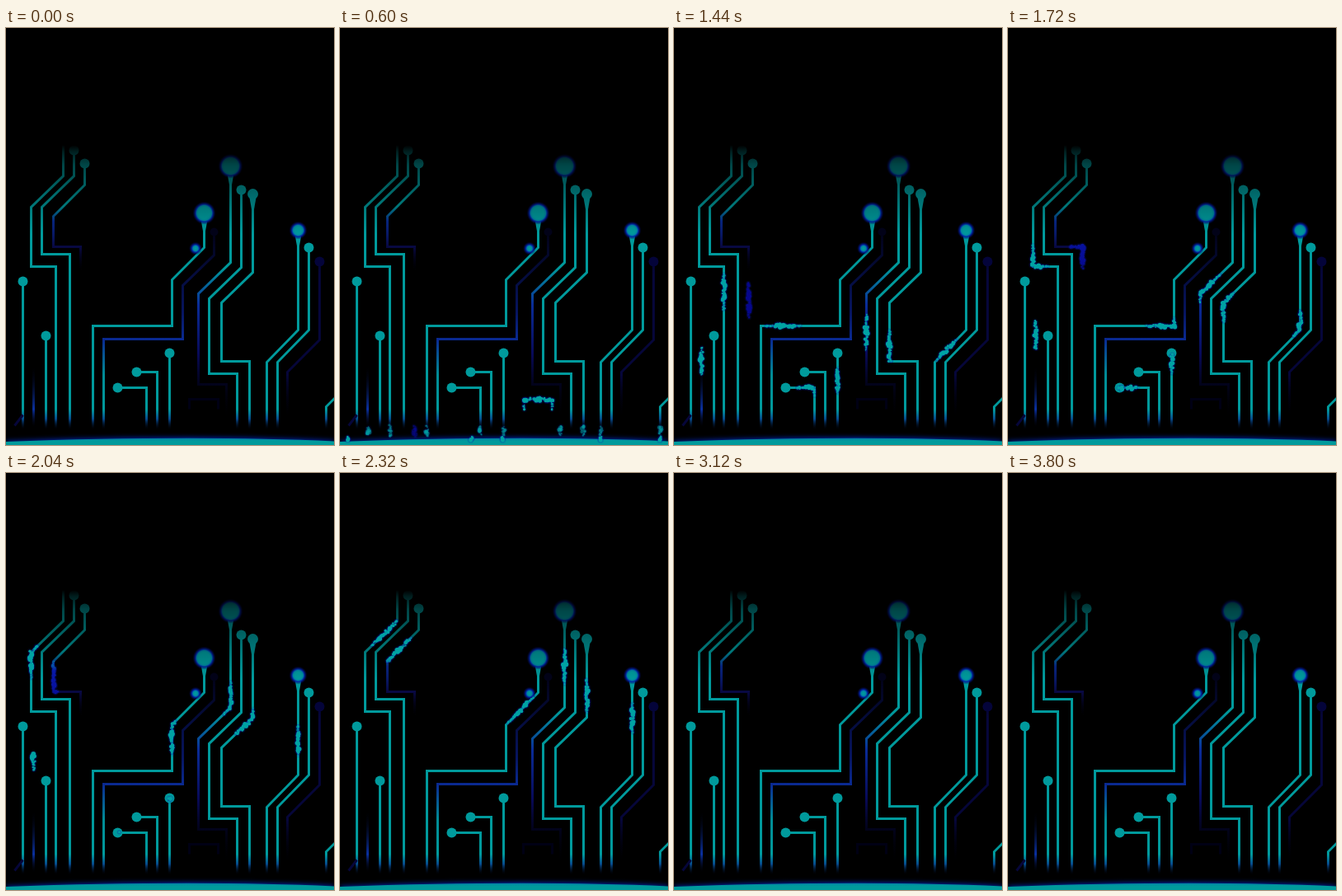
Recreate the animation shown at these times as an HTML page with a canvas. Size 398 by 506 pixels, loop 3.84 s.

```html
<!DOCTYPE html>
<html lang="en">
<head>
<meta charset="utf-8">
<title>Circuit pulses</title>
<style>
  html, body { margin: 0; width: 100%; height: 100%; overflow: hidden; background: #000; }
  canvas { display: block; }
</style>
</head>
<body>
<canvas id="stage" width="398" height="506"></canvas>
<script>
const W = 398, H = 506, LOOP = 3840, TICK = 40;
const TEAL = '#009a9c', SPARK = '#00a2a4', CLEAR = '#00001000';
const ctx = document.getElementById('stage').getContext('2d');
const board = Object.assign(document.createElement('canvas'), { width: W, height: H });

// Vertical gradient from stops given in stage pixels
function shade(...stops) {
  const grad = ctx.createLinearGradient(0, 0, 0, H);
  stops.forEach(([y, color]) => grad.addColorStop(y / H, color));
  return grad;
}

const foot = [[462, TEAL], [474, '#064a8c'], [487, CLEAR]];
const teal = shade(...foot);
const navy = shade([240, '#020218'], [300, '#06063a'], [420, '#06063a'], [470, CLEAR]);
const dimTop = shade([250, '#020218'], [345, '#071560'], [378, '#0a2a92'], [420, '#008c96'], ...foot);
const dimSide = shade([216, TEAL], [234, '#08288a'], [266, '#080840'], [294, CLEAR]);
const dimStub = shade([410, CLEAR], [462, '#0a30a0'], [484, CLEAR]);
const dimFoot = shade([290, TEAL], [335, '#0a2c98'], [395, '#080a58'], [470, CLEAR]);
const blueLow = shade([225, SPARK], [240, '#0818a8'], [300, '#06068c']);

// color: line, r: end node radius, halo: glowing node, v: pulse speed, fill: pulse colour
const routes = [
  { d: 'M341 500V417L380 378V283', color: navy, r: 6, node: '#04043a' },
  { d: 'M118 500V377H214V312L252 275V247', color: dimTop, r: 5, node: '#020218' },
  { d: 'M90 500V265H57V228L95 190V164', color: dimSide, r: 6, v: 1.03, fill: blueLow },
  { d: 'M33 500V340', color: dimStub, v: 0.55 },
  { d: 'M267 500V432H233V322L272 284V167', color: dimFoot, r: 11, halo: true, v: 1 },
  { d: 'M60 500V289H30V217L69 179V125', v: 1.1 },
  { d: 'M77 500V274H43V217L82 179V148', r: 6 },
  { d: 'M20 500V307', r: 6 },
  { d: 'M48 500V373', r: 6 },
  { d: 'M105 500V361H201V305L240 266V224', r: 10, halo: true, v: 1 },
  { d: 'M170 500V436H135', r: 6, v: 0.38 },
  { d: 'M183 500V417H158', r: 6 },
  { d: 'M198 500V394', r: 6, v: 0.4 },
  { d: 'M280 500V419H246V328L285 290V196', r: 6 },
  { d: 'M295 500V404H261V333L299 296V201', r: 6.5, v: 0.88 },
  { d: 'M316 500V405L354 366V245', r: 7, halo: true, v: 0.68 },
  { d: 'M329 500V405L367 366V266', r: 6 },
  { d: 'M388 500V459L400 447', v: 0.4 }
];
const hook = { d: 'M257 462V450H222V462', color: '#000014' };

for (const route of [hook, ...routes]) {
  route.path = document.createElementNS('http://www.w3.org/2000/svg', 'path');
  route.path.setAttribute('d', route.d);
  route.length = route.path.getTotalLength();
  route.end = route.path.getPointAtLength(route.length);
}

function dot(g, x, y, r, color) {
  g.fillStyle = color;
  g.beginPath();
  g.arc(x, y, r, 0, 7);
  g.fill();
}

function glowDot(g, x, y, r) {
  const reach = r + 4, grad = g.createRadialGradient(x, y, r - 3, x, y, reach);
  grad.addColorStop(0, TEAL);
  grad.addColorStop(0.3, '#0084a4');
  grad.addColorStop(0.5, '#0028a8');
  grad.addColorStop(1, '#00006000');
  dot(g, x, y, reach, grad);
}

// Line widens where it meets a large node
function neck(g, x, y, r) {
  g.fillStyle = TEAL;
  g.beginPath();
  g.moveTo(x - 4, y + r - 2);
  g.lineTo(x + 4, y + r - 2);
  g.lineTo(x + 1.5, y + r + 12);
  g.lineTo(x - 1.5, y + r + 12);
  g.fill();
}

function drawBoard(g) {
  g.fillRect(0, 0, W, H);
  g.save();
  g.translate(0.5, 0.5);
  g.lineWidth = 3;
  for (const { d, color = teal } of [hook, ...routes]) {
    g.strokeStyle = color;
    g.stroke(new Path2D(d));
  }
  g.strokeStyle = '#06063a';
  g.stroke(new Path2D('M20 469L10 482'));

  for (const { r, halo, node = TEAL, end: { x, y } } of routes) {
    if (r > 6) neck(g, x, y, r);
    if (halo) glowDot(g, x, y, r);
    else if (r) dot(g, x, y, r, node);
  }
  glowDot(g, 229.5, 267, 4);
  g.restore();

  g.fillStyle = shade([142, '#000'], [150, '#000000cc'], [166, '#0000008c'], [250, '#00000000']);
  g.fillRect(0, 0, W, 250);

  g.beginPath();
  g.moveTo(0, 502);
  g.quadraticCurveTo(230, 494, W, 501.5);
  g.lineTo(W, H);
  g.lineTo(0, H);
  g.shadowColor = '#0030e0';
  g.shadowBlur = 6;
  g.fillStyle = shade([497, '#0478a8'], [501, TEAL]);
  g.fill();
}

const clamp = (v, lo, hi) => Math.min(hi, Math.max(lo, v));
function noise(a, b) {
  const v = Math.sin(a * 12.9898 + b * 78.233) * 43758.5453;
  return v - Math.floor(v);
}

function blobs(list, fill) {
  list.forEach(([x, y, r]) => dot(ctx, x, y, r + 1.5, '#0a18b028'));
  list.forEach(([x, y, r]) => dot(ctx, x, y, r, fill));
}

// Ragged spark covering part of a route
function surge(route, mid, size, seed) {
  const from = mid - size / 2, list = [];
  const last = Math.min(route.length, mid + size / 2);
  for (let s = Math.max(0, from); s < last; s += 1.2) {
    const p = route.path.getPointAtLength(s), i = Math.round(s);
    const taper = 0.5 + 0.5 * Math.sin(Math.PI * (s - from) / size);
    const jitter = k => 0.5 + (noise(i + k, seed) - 0.5) * 4 * taper;
    const lump = 1.4 + 1.3 * noise(i, seed) + 0.6 * Math.sin(s * 0.4 + seed);
    list.push([p.x + jitter(40), p.y + jitter(80), Math.max(0.6, lump * taper)]);
  }
  blobs(list, route.fill || SPARK);
}

// Flame rising from the ground
function spike(x, h, seed) {
  const list = [];
  for (let i = 0; i < h; i++) {
    list.push([x + (noise(i, seed) - 0.5) * 3, 500 - i, 0.8 + (h - i) * 0.33]);
  }
  blobs(list, SPARK);
}

function distance(t) {
  const s = (t - 600) / 1000;
  return 12 + 180 * s - 10 * Math.sin(4 * s);
}

function draw(t) {
  const tick = t / TICK;
  ctx.globalAlpha = 1;
  ctx.drawImage(board, 0, 0);

  const near = (at, span) => 1 - Math.abs(t - at) / span;
  if (near(600, 300) > 0) surge(hook, 30 + (t - 600) * 0.2, 62, tick);
  spike(257, 18 * near(1000, 160), tick);

  if (t < 480) return;
  const grow = clamp((t - 440) / 500, 0, 1);
  const run = distance(t) - 12;
  ctx.globalAlpha = clamp((t - 440) / 300, 0, 1);
  routes.forEach((route, n) => {
    if (route.v) surge(route, 12 + route.v * run, (24 + 18 * route.v) * grow, tick + n * 17);
  });
  ctx.globalAlpha = 1;
  [10, 160, 197, 316, 388].forEach(x => spike(x, 5 * near(600, 140), tick + x));
}

drawBoard(board.getContext('2d'));
const begin = performance.now();
function loop() {
  const t = (performance.now() - begin) % LOOP;
  draw(Math.floor(t / TICK) * TICK);
  requestAnimationFrame(loop);
}
loop();
</script>
</body>
</html>
```
